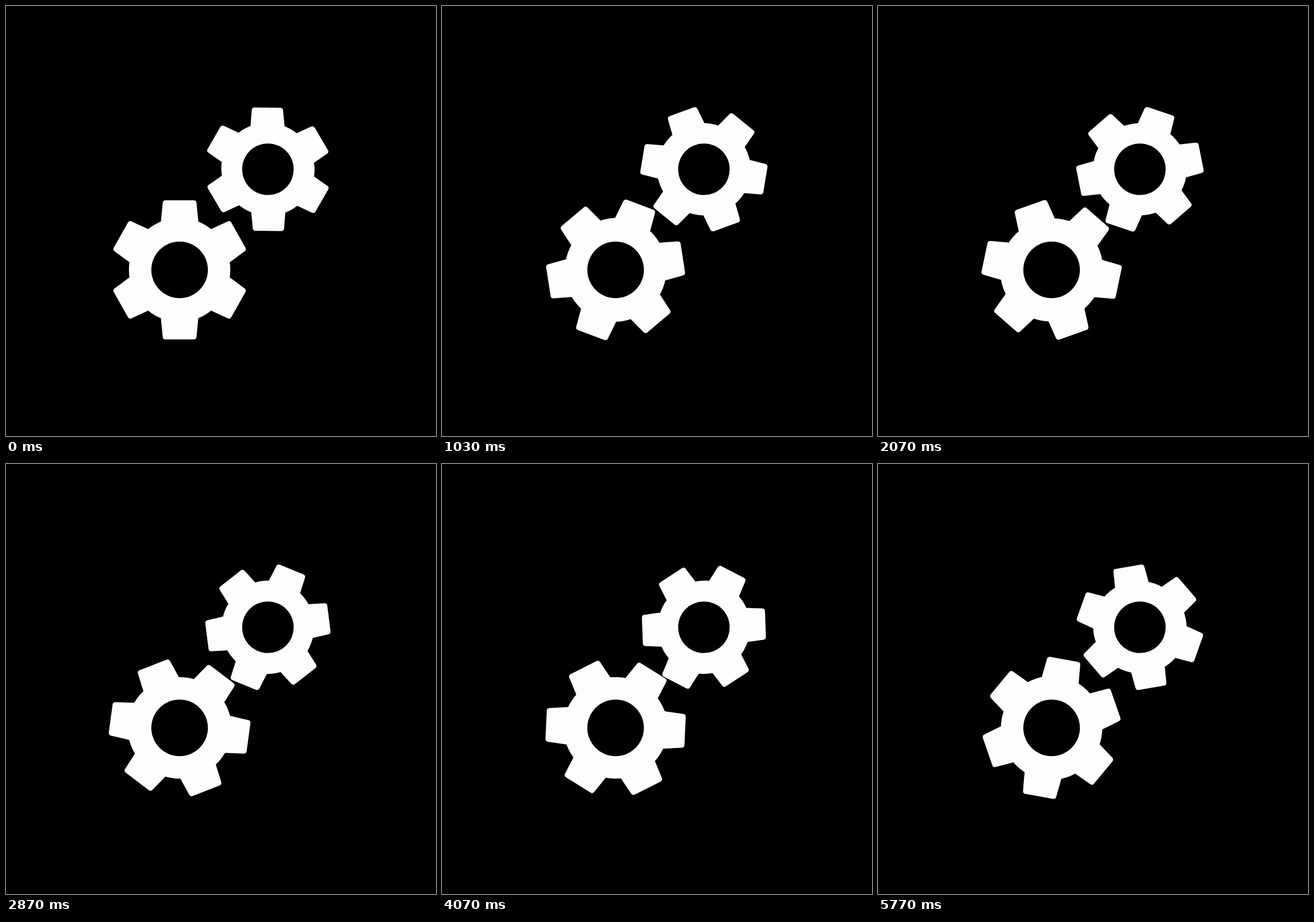
These frames come from a looping animation (748 px wide and 748 px high, 5.81 s). An HTML page with a canvas:

```html
<!DOCTYPE html>
<html lang="en">
<head>
<meta charset="utf-8">
<title>Gears</title>
<style>
  html, body { margin: 0; width: 100%; height: 100%; overflow: hidden; background: #000; }
  canvas { display: block; }
</style>
</head>
<body>
<canvas id="stage" width="748" height="748"></canvas>
<script>
const ctx = document.getElementById('stage').getContext('2d');
const LOOP = 5810;
const LAST_STEP = 173;
const STEPS_PER_TURN = 70;
const TEETH = 6;
const ROOT = 60; // teeth start this far from the centre, hidden by the disc

// Each body is a touch narrower across its axis (radians clockwise from the top).
const gears = [
  { x: 302, y: 459, dir: -1, disc: 90.5, hole: 49.2, tip: 121,
    rootHalf: 35.8, tipHalf: 29.7, axis: 0, squash: 0.975 },
  { x: 455.6, y: 284, dir: 1, disc: 81.6, hole: 44.8, tip: 108.5,
    rootHalf: 31.2, tipHalf: 27, axis: 2.18, squash: 0.982 }
];

function disc(r, color) {
  ctx.fillStyle = color;
  ctx.beginPath();
  ctx.arc(0, 0, r, 0, Math.PI * 2);
  ctx.fill();
}

function tooth({ rootHalf, tipHalf, tip }) {
  ctx.beginPath();
  ctx.moveTo(-rootHalf, -ROOT);
  ctx.arcTo(-tipHalf, -tip, tipHalf, -tip, 5);
  ctx.arcTo(tipHalf, -tip, rootHalf, -ROOT, 5);
  ctx.lineTo(rootHalf, -ROOT);
  ctx.fill();
}

function drawGear(g, turn) {
  ctx.save();
  ctx.translate(g.x, g.y);
  ctx.save();
  ctx.rotate(g.dir * turn + g.axis);
  ctx.scale(g.squash, 1);
  ctx.rotate(-g.axis);
  disc(g.disc, '#fdfdfd');
  for (let i = 0; i < TEETH; i++) {
    tooth(g);
    ctx.rotate(Math.PI * 2 / TEETH);
  }
  ctx.restore();
  disc(g.hole, '#000');
  ctx.restore();
}

// Thirty steps a second on a 10 ms clock; the opening skips every third step.
function stepAt(t) {
  const rest = t % 100;
  let n = Math.floor(t / 100) * 3 + (rest >= 70 ? 2 : rest >= 30 ? 1 : 0);
  if (n < 35 && n % 3 === 2) n--;
  return Math.min(n, LAST_STEP);
}

function draw(t) {
  const turn = stepAt(t) / STEPS_PER_TURN * Math.PI * 2;
  ctx.fillStyle = '#000';
  ctx.fillRect(0, 0, 748, 748);
  for (const g of gears) drawGear(g, turn);
}

const start = performance.now();
function tick() {
  draw((performance.now() - start) % LOOP);
  requestAnimationFrame(tick);
}
tick();
</script>
</body>
</html>
```
